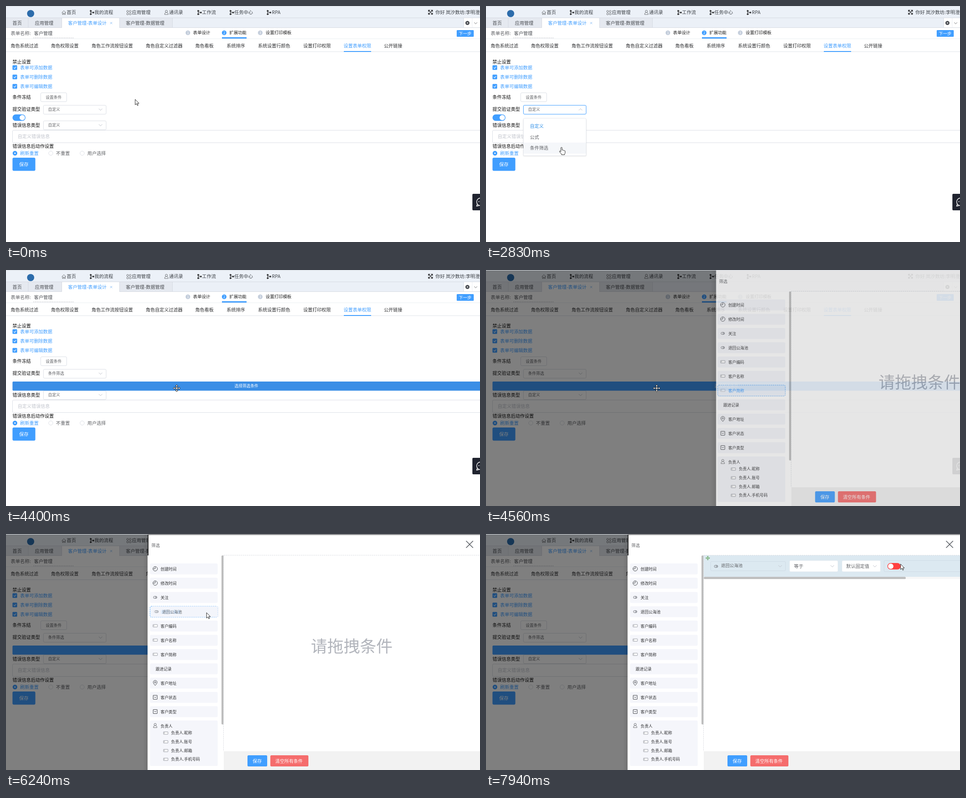
These frames come from a looping animation (1058 by 529 pixels, 8000 ms). An HTML page:

```html
<!DOCTYPE html>
<html lang="zh-CN">
<head>
<meta charset="utf-8">
<title>表单权限设置</title>
<style>
html, body { margin: 0; width: 100%; height: 100%; overflow: hidden; background: #fff; }
svg { display: block; width: 100vw; height: 100vh; }
text { font-family: "Noto Sans CJK SC", "Noto Sans CJK", "Noto Sans", sans-serif; white-space: pre; }
.item .card { fill: #f5f6fb; }
.item.on .card { fill: #eff5fd; stroke: #59a9fb; stroke-dasharray: 2.5 1.8; }
.item.on text { fill: #409eff; }
.item.on .icon { opacity: .5; }
.option rect { fill: #fff; }
.option.over rect { fill: #f5f7fa; }
.option text { fill: #606266; }
.option.picked text { fill: #2f8fe8; }
.pointer path { fill: #fff; stroke: #111; stroke-width: .9; }
</style>
</head>
<body>
<svg id="stage" viewBox="0 0 1058 529" xmlns="http://www.w3.org/2000/svg"></svg>
<script>
const LOOP = 8000;
const BLUE = '#409eff', DARK = '#303133', GREY = '#606266', EDGE = '#dcdfe6', PALE = '#c0c4cc';

// Drawing helpers; text is placed by its left edge and vertical centre.
const text = (x, y, size, fill, str, more = '') =>
  `<text x="${x - .4}" y="${y + size * .375}" font-size="${size}" fill="${fill}" ${more}>${str}</text>`;
const rect = (x, y, w, h, fill, more = '') =>
  `<rect x="${x}" y="${y}" width="${w}" height="${h}" fill="${fill}" ${more}/>`;
const box = (x, y, w, h, fill = '#fff', edge = EDGE, r = 2.5, more = '') =>
  rect(x + .5, y + .5, w - 1, h - 1, fill, `stroke="${edge}" rx="${r}" ${more}`);
const line = (d, color = DARK, width = 1, more = '') =>
  `<path d="${d}" fill="none" stroke="${color}" stroke-width="${width}" ${more}/>`;
const dot = (x, y, r, fill, more = '') => `<circle cx="${x}" cy="${y}" r="${r}" fill="${fill}" ${more}/>`;
const ring = (x, y, r, color, width = 1) => dot(x, y, r, 'none', `stroke="${color}" stroke-width="${width}"`);
const group = (body, more = '') => `<g ${more}>${body}</g>`;
const chevron = (x, y, more = '') => line(`M${x - 4} ${y - 2}l4 4 4-4`, PALE, 1, more);

const person = (x, y) => ring(x, y - 2, 2.5, GREY, .9) + line(`M${x - 4} ${y + 5}q0-4.5 4-4.5t4 4.5z`, GREY, .9);
const flow = x => line(`M${x - 3} 11v7M${x - 3} 14.5h6M${x} 11.5h-3M${x} 18h-3`, DARK, 1) +
  [[-3, 11], [-3, 18.3], [3, 14.7]].map(([a, y]) => dot(x + a, y, 1.9, DARK)).join('');

function header() {
  const menu = [[136, '首页'], [198, '我的流程'], [281.5, '应用管理'], [364.5, '通讯录'],
    [438, '工作流'], [510, '任务中心'], [594, 'RPA']];
  const grid = [[271.5, 12], [277.3, 12], [271.5, 17.8], [277.3, 17.8]];
  return rect(0, 0, 1058, 27, '#ecf1f8') + rect(0, 0, 1058, 1, '#d9dde3') +
    dot(55, 17, 8, '#2c6cab') +
    line('M124.5 15l4.7-4.5 4.7 4.5M126 14v5h2.2v-3h2v3h2.2v-5', GREY, .9) +
    [192, 432, 504, 587].map(flow).join('') +
    grid.map(([x, y]) => ring(x, y, 2.1, GREY, .9)).join('') + person(358, 14) +
    menu.map(([x, s]) => text(x, 14.5, 10.4, '#3c4046', s)).join('') +
    line('M943.5 10l8 8M951.5 10l-8 8M943 12.8V9.5h3.3M948.7 9.5h3.3v3.3M952 15.2v3.3h-3.3M946.3 18.5H943v-3.3', DARK, 1.4) +
    text(959, 14.5, 10.4, '#3c4046', '你好 岚汐数坊:李明澄');
}

function pageTabs() {
  return rect(0, 27, 1058, 22, '#ebf0f7') + rect(0, 27, 371, 22, '#e5e9f0') +
    rect(125, 27, 128, 22, '#fff') +
    line('M0 26.5h1058M0 48.5h124.5M253 48.5h805M49.5 27v21M124.5 27v21M253.5 27v21M371.5 27v21', '#d6dae2') +
    text(15, 38, 10.3, '#4a4d52', '首页') + text(65, 38, 10.3, '#4a4d52', '应用管理') +
    text(139, 38, 10.3, BLUE, '客户管理-表单设计') + text(268, 38, 10.3, '#4a4d52', '客户管理-数据管理') +
    line('M232.5 36l4.5 4.5M237 36l-4.5 4.5', '#7db6f2', .9) +
    rect(1022, 27, 36, 21, '#fff') + line('M1021.5 27v21', EDGE) +
    dot(1030, 38, 4.6, '#45484d') + line('M1028.3 36.3l3.4 3.4M1031.7 36.3l-3.4 3.4', '#fff') +
    line('M1040.5 27v21', '#eceff4') + line('M1045 36.8l3.4 3.2 3.4-3.2', GREY, .9);
}

function steps() {
  const list = [[406, 418, '表单设计'], [487, 499, '扩展功能'], [567.5, 580, '设置打印模板']];
  const tabs = [[11, '角色系统过滤'], [101, '角色权限设置'], [191.5, '角色工作流按钮设置'], [312.5, '角色自定义过滤器'],
    [423, '角色看板'], [493, '系统排序'], [563, '系统设置行颜色'], [664, '设置打印权限'], [754, '设置表单权限'], [844, '公开链接']];
  return text(11, 61, 10.5, GREY, '表单名称:') + text(63, 61.5, 10.3, '#4a4d52', '客户管理') +
    line('M61 71.5h91', '#b9bcc2', 1, 'stroke-dasharray="2.2 1.6"') +
    list.map(([c, x, s], i) => dot(c, 60, 5.2, i == 1 ? BLUE : '#c3cddb') +
      text(c + .4, 60, 7.5, '#fff', i + 1, 'text-anchor="middle"') + text(x, 59.5, 9.6, '#222', s)).join('') +
    rect(482, 70, 55, 3, BLUE) + rect(1006, 54, 38, 15, BLUE, 'rx="1.5"') + text(1011, 61.2, 9.5, '#fff', '下一步') +
    line('M0 73.5h1058', '#ebeef3') + line('M0 102.5h1058', '#dfe3e9') +
    tabs.map(([x, s]) => text(x, 89, 10.25, x == 754 ? BLUE : DARK, s)).join('') + rect(754, 101, 61, 2, BLUE);
}

function form() {
  const checks = ['表单可添加数据', '表单可删除数据', '表单可编辑数据'];
  const radios = [[20, '刷新重置'], [100, '不重置'], [170, '用户选择']];
  const lower = text(15, 267, 10.25, '#111', '错误信息类型') +
    box(83, 257, 141, 21) + text(94.5, 267, 8.9, GREY, '自定义') + chevron(211, 267) +
    box(14, 278, 1060, 29) + text(26.5, 292, 10.25, PALE, '自定义错误信息') +
    text(15, 314, 10.25, '#111', '错误信息后动作设置') +
    radios.map(([x, s], i) => (i ? ring(x, 330, 4.7, EDGE) : dot(x, 330, 5.2, BLUE) + dot(x, 330, 1.6, '#fff')) +
      text(x + 12, 330, 10.3, i ? GREY : BLUE, s)).join('') +
    rect(14.5, 340, 51, 29.5, BLUE, 'rx="3"') + text(30, 355, 10.3, '#fff', '保存');
  return text(15, 125, 10.25, '#111', '禁止设置') +
    checks.map((s, i) => {
      const y = 138 + 21 * i;
      return rect(14.5, y - 5.2, 10.4, 10.4, BLUE, 'rx="1.5"') + line(`M17.2 ${y}l2 2.2 3.4-4.2`, '#fff', 1.1) +
        text(32, y, 10.25, BLUE, s);
    }).join('') +
    text(15, 204, 10.25, '#111', '条件冻结') + box(77, 194, 59, 21) + text(89, 204.5, 8.9, GREY, '设置条件') +
    text(15, 231.5, 10.25, '#111', '提交验证类型') + box(83, 222, 141, 21, '#fff', EDGE, 2.5, 'id="typeBox"') +
    text(94.5, 232, 8.9, GREY, '', 'id="typeText"') + chevron(211, 232, 'id="typeArrow"') +
    group(rect(14.5, 243, 29, 14.5, BLUE, 'rx="7.25"') + dot(36.3, 250.2, 5.9, '#fff'), 'id="toggle"') +
    group(lower, 'id="lower"') +
    group(rect(14.5, 250, 1060, 20.5, BLUE, 'id="barFill" rx="2"') + text(510.5, 260, 8.85, '#fff', '选择筛选条件'), 'id="bar"');
}

function dropdown() {
  const options = ['自定义', '公式', '条件筛选'];
  return group(rect(82, 1, 143, 86, '#000', 'opacity=".05" rx="4"') + box(83, 0, 141, 85, '#fff', '#e4e7ed', 3) +
    options.map((s, i) => group(rect(84, 5.5 + 24.8 * i, 139, 24.8, '') +
      text(98.5, 18 + 24.8 * i, 10.25, '', s), 'class="option"')).join(''), 'id="menu"');
}

const ICONS = {
  clock: (x, y) => ring(x, y, 5, '#45484d', 1) + line(`M${x} ${y - 4}v4h-4`, '#45484d'),
  toggle: (x, y) => box(x - 4.5, y - 3, 9, 6, 'none', '#777a80', 2.7) + ring(x + 1.3, y, 1.4, '#777a80', .9),
  input: (x, y) => box(x - 5.5, y - 3.5, 11, 6.5, '#fff', '#9a9da5', .5) + line(`M${x - 3} ${y - 2}v3`, '#777a80', .8),
  pin: (x, y) => line(`M${x} ${y + 5.5}q-4.4-4.3-4.4-7a4.4 4.4 0 0 1 8.8 0q0 2.7-4.4 7z`, '#45484d') + ring(x, y - 1.5, 1.6, '#45484d'),
  pick: (x, y) => box(x - 5, y - 5, 10, 10, 'none', '#45484d', .5) + line(`M${x - 2.5} ${y - 1.5}l2.5 2.5 2.5-2.5`, '#45484d'),
  person: (x, y) => person(x, y - 1)
};
const FIELDS = [['创建时间', 'clock'], ['修改时间', 'clock'], ['关注', 'toggle'], ['退回公海池', 'toggle'],
  ['客户编码', 'input'], ['客户名称', 'input'], ['客户简称', 'input'], ['跟进记录', ''], ['客户地址', 'pin'],
  ['客户状态', 'pick'], ['客户类型', 'pick'], ['负责人', 'person']];
const OWNER = ['昵称', '账号', '邮箱', '手机号码'];

function field(i) {
  const [name, icon] = FIELDS[i], y = 78 + 32 * i, last = i == FIELDS.length - 1;
  return group(rect(321.5, y - 12, 151, last ? 102 : 24.5, '', 'class="card" rx="3"') +
    (icon ? group(ICONS[icon](333, y), 'class="icon"') : '') +
    text(icon ? 345.5 : 334.5, y + (last ? 1 : .3), 8.9, DARK, name) +
    (last ? OWNER.map((s, k) => ICONS.input(356.5, 446.5 + 19.6 * k) +
      text(369, 446 + 19.6 * k, 8.85, DARK, '负责人.' + s)).join('') : ''), 'class="item"');
}

function condition() {
  const edge = '#cfdbe5';
  const arm = a => line('M0 0V-4.3M-1.6-2.7L0-4.3 1.6-2.7', 'currentColor', 1, `transform="rotate(${a})"`);
  return rect(486, 48, 572, 48, '#dce9f1') +
    group([0, 90, 180, 270].map(arm).join(''), 'id="grip" transform="translate(495 54)"') +
    box(501, 61, 168, 22, 'none', edge) + ICONS.toggle(513.5, 72.5) + text(525, 70.5, 9.65, GREY, '退回公海池') + chevron(656.5, 72) +
    box(677, 59, 109, 26, '#fff', '#e4eaf0') + text(688, 72, 10.3, GREY, '等于') + chevron(773, 72) +
    box(794, 59, 87, 26, '#fff', '#e4eaf0') + text(804.5, 72, 10.3, GREY, '默认固定值') + chevron(868, 72) +
    box(888, 59, 190, 26, 'none', edge) + rect(896, 65, 29.5, 14.6, '#ff4040', 'rx="7.3"') + dot(903.4, 72.3, 6, '#fff') +
    rect(486, 96, 572, 5, '#f7f7f7') + rect(486, 96, 451, 5, '#bfbfbf', 'rx="2.5"');
}

function drawer() {
  return rect(306, 1, 12, 528, 'url(#shade)') + rect(318, 1, 740, 528, '#fff') +
    text(325, 25, 9.4, GREY, '筛选') +
    FIELDS.map((_, i) => field(i)).join('') +
    rect(481, 48, 4.5, 379, '#bdbdbd', 'rx="2.2"') +
    line('M486 47.5h572M485.5 48v439', '#d5d8dd', 1, 'stroke-dasharray="2.5 1.8"') +
    rect(486, 487, 572, 42, '#f2f2f2') +
    rect(539, 496, 44, 25, BLUE, 'rx="2.5"') + text(551, 509, 10.2, '#fff', '保存') +
    rect(590, 496, 85, 25, '#f56c6c', 'rx="2.5"') + text(601.5, 509, 10.2, '#fff', '清空所有条件') +
    text(681, 251, 36.5, '#b2b5bc', '请拖拽条件', 'id="hint"') +
    group(condition(), 'id="condition"') +
    line('M1027 15.5l15.5 15.5M1042.5 15.5l-15.5 15.5', '#5c6066', 1.7) +
    rect(1017.5, 8.5, 35, 32, 'none', 'id="closeFocus" stroke="#111" stroke-width="2" rx="2"') +
    group(rect(316, 48, 2, 481, '#fff') + rect(316.5, 1, 1.5, 47, '#111') + rect(317, 1, 741, 1, '#333'), 'id="focusRing"');
}

const POINTERS = {
  arrow: 'M.3.3v12.2l2.9-2.6 2 4.2 1.9-.9-2-4h3.8z',
  hand: 'M-1.4 1.2a1.4 1.4 0 0 1 2.8 0V6q2-1 2.5.6 2-.8 2.4.8 1.8-.5 1.8 1.2v3.2q0 2-1.2 3.2v1.4H.2V15L-4.2 10q-1-2 .8-2.2l2 1.8z',
  move: 'M0-8l2.8 3H1v4h4v-1.8L8 0 5 2.8V1H1v4h1.8L0 8l-2.8-3H-1V1h-4v1.8L-8 0l3-2.8V-1h4v-4h-1.8z'
};

const stage = document.getElementById('stage');
stage.innerHTML = '<defs><linearGradient id="shade"><stop stop-opacity="0"/><stop offset="1" stop-opacity=".12"/></linearGradient></defs>' +
  rect(0, 0, 1058, 529, '#fff') + header() + pageTabs() + steps() + form() + dropdown() +
  rect(1041, 421, 20, 37, '#20232f', 'rx="2"') + ring(1059, 439, 8.5, '#fff', 1.4) + line('M1052 444l-1.5 4.5 5-1', '#fff', 1.4) +
  dot(1055.5, 438.5, 1.1, '#fff') + rect(0, 1, 1058, 528, '#000', 'id="mask"') +
  group(drawer(), 'id="drawer"') + group(field(3), 'id="ghost" opacity=".7"') +
  group('<path id="pointer"/>', 'class="pointer"');

const $ = id => document.getElementById(id);
const set = (id, name, value) => $(id).setAttribute(name, value);
const show = (id, on) => set(id, 'display', on ? 'inline' : 'none');
const items = [...document.querySelectorAll('#drawer .item')];
const options = [...document.querySelectorAll('.option')];

// Pointer path: time, x, y.
const PATH = [[0, 288, 209], [70, 288, 209], [250, 276, 198], [820, 209, 235], [980, 208, 235], [1120, 205, 235],
  [1900, 205, 235], [2200, 238, 258], [2420, 215, 283], [2760, 171, 312], [2830, 168.5, 317], [3130, 168.5, 317],
  [3470, 186, 300], [3560, 186, 300], [4330, 381, 265], [4670, 381, 265], [5080, 465, 194], [5190, 465, 194],
  [5280, 455, 229], [5350, 455, 229], [6000, 444, 176], [6200, 444, 176], [6680, 605, 176], [6780, 600, 160],
  [6890, 600, 160], [7160, 820, 67], [7270, 820, 67], [7480, 895, 46], [7710, 924, 57], [7790, 925, 63], [7860, 925, 63],
  [7940, 925, 67], [LOOP, 925, 67]];
const SHAPES = [[0, 'arrow'], [700, 'hand'], [2080, 'arrow'], [2360, 'hand'], [3160, 'arrow'], [3960, 'hand'],
  [4380, 'move'], [5050, 'arrow'], [5230, 'move'], [6220, 'arrow'], [7090, 'hand'], [7290, 'arrow']];

const clamp = v => Math.max(0, Math.min(1, v));
function pointer(t) {
  const i = Math.max(1, PATH.findIndex(p => p[0] > t)), a = PATH[i - 1], b = PATH[i];
  const u = clamp((t - a[0]) / (b[0] - a[0])), k = u * u * (3 - 2 * u);
  return [a[1] + (b[1] - a[1]) * k, a[2] + (b[2] - a[2]) * k];
}
// Standard "ease" timing curve.
function ease(x) {
  x = clamp(x);
  let lo = 0, hi = 1;
  for (let i = 0; i < 20; i++) {
    const s = (lo + hi) / 2;
    if (.75 * s * (1 - s) + s ** 3 < x) lo = s; else hi = s;
  }
  return .3 * lo * (1 - lo) ** 2 + 3 * lo * lo * (1 - lo) + lo ** 3;
}
const easeOut = x => 1 - (1 - clamp(x)) ** 4;

function draw(t) {
  const [x, y] = pointer(t);
  const picked = t >= 3130, filtered = t >= 3150, dragging = t >= 6240 && t < 6690;

  const open = picked ? 1 - easeOut((t - 3130) / 300) : easeOut((t - 1420) / 300);
  show('menu', open > .005);
  set('menu', 'transform', `translate(0 251) scale(1 ${open})`);
  set('menu', 'opacity', open);
  set('typeArrow', 'transform', `rotate(${180 * open} 211 232)`);
  set('typeBox', 'stroke', t >= 1420 && t < 4330 ? BLUE : t >= 700 && t < 1420 ? PALE : EDGE);
  $('typeText').textContent = picked ? '条件筛选' : '自定义';
  const over = picked ? 2 : t < 2000 ? 0 : x > 223 ? -1 : Math.floor((y - 256.5) / 24.8);
  options.forEach((o, i) => {
    o.classList.toggle('over', i == over);
    o.classList.toggle('picked', i == (picked ? 2 : 0));
  });

  show('toggle', !filtered);
  show('bar', filtered);
  set('lower', 'transform', `translate(0 ${filtered ? 13 : 0})`);
  const onBar = filtered && t < 4425 && y >= 250 && y <= 270;
  set('barFill', 'fill', onBar ? (t >= 4330 ? '#3a8ee6' : '#66b1ff') : BLUE);

  const step = Math.floor(t / 80) * 80;
  const slide = ease((step - 4428) / 300);
  set('mask', 'opacity', .5 * ease((step - 4425) / 130));
  show('drawer', slide > 0);
  set('drawer', 'opacity', ease((step - 4410) / 300));
  set('drawer', 'transform', `translate(${740 * (1 - slide)} 0)`);
  const inList = slide > 0 && t < 6690 && x > 321 && x < 473;
  items.forEach((el, i) => {
    const top = 66 + 32 * i;
    el.classList.toggle('on', dragging ? i == 3 : inList && y >= top - 1 && y <= top + 25);
  });
  show('closeFocus', t < 6240);
  show('focusRing', t >= 6240);
  show('hint', t < 6690);
  show('condition', t >= 6690);
  set('grip', 'color', t >= 7300 ? '#4f9a45' : '#45484d');

  show('ghost', dragging);
  set('ghost', 'transform', `translate(${x - 444} ${y - 176})`);

  const shape = SHAPES.filter(s => s[0] <= t).pop()[1];
  set('pointer', 'd', POINTERS[shape]);
  set('pointer', 'transform', `translate(${x} ${y})`);
}

const start = performance.now();
function tick() {
  draw((performance.now() - start) % LOOP);
  requestAnimationFrame(tick);
}
tick();
</script>
</body>
</html>
```
